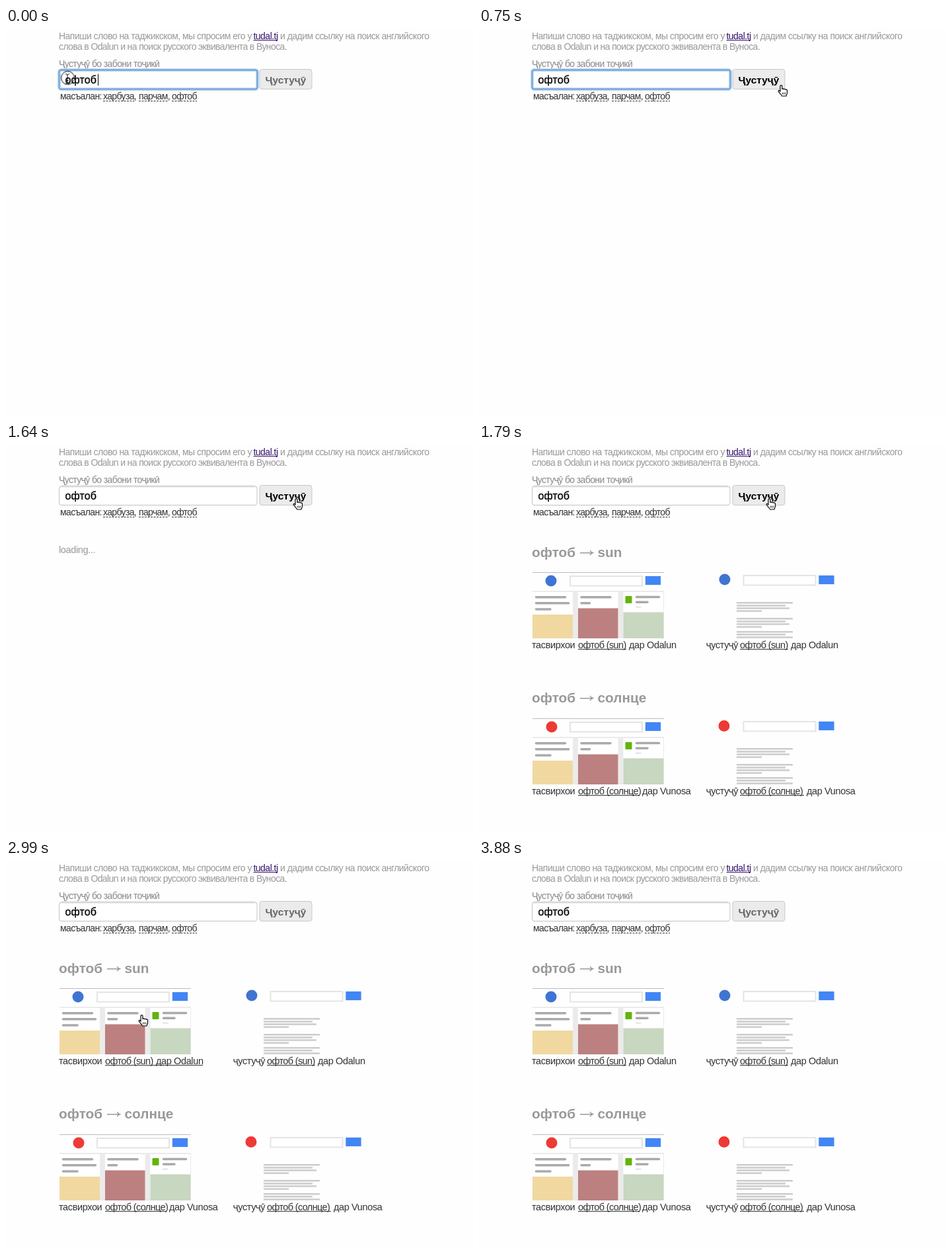
Animation of 707x587 px, one loop 5.4 s. Source, as an HTML page:

```html
<!DOCTYPE html>
<html lang="ru">
<head>
<meta charset="utf-8">
<title>Dictionary search</title>
<style>
  html, body { margin: 0; width: 100%; height: 100%; overflow: hidden; background: #fefefe; }
  svg { display: block; width: 707px; height: 587px; }
  text { font: 14px "Liberation Sans", Arial, sans-serif; white-space: pre; }
  .note { fill: #999; letter-spacing: -.53px; }
  .label { fill: #888; letter-spacing: -.62px; }
  .hint { fill: #333; letter-spacing: -.64px; }
  .word { font-size: 16px; letter-spacing: .1px; stroke: #000; stroke-width: .3px; }
  .btn { font-size: 15.5px; font-weight: bold; text-anchor: middle; }
  .head { font-size: 20.8px; font-weight: bold; fill: #999; }
  .cap { font-size: 14.5px; fill: #333; letter-spacing: -.38px; }
  .link { letter-spacing: -.63px; }
  .loading { fill: #999; }
  .line { fill: none; stroke: #333; }
  .dash { stroke-dasharray: 3 1.5; }

  /* Every part holds its pose until the next step of the 5.4 s loop. */
  .step { animation: 5.4s step-end infinite; }
  .beam { animation-name: beam; }
  .hand { animation-name: hand; }
  .arrow { animation-name: arrow; }
  .ring { animation-name: ring; }
  .caret { animation-name: caret; }
  .focus { animation-name: focus; }
  .btn { animation-name: hover; }
  .loading { animation-name: loading; }
  .results { animation-name: results; }
  .under-end { animation-name: under-end; }
  .under-start { animation-name: under-start; }

  @keyframes beam {
    0% { transform: translate(89.5px, 69px); visibility: visible; }
    5.55% { transform: translate(235px, 73px); visibility: visible; }
    8.33% { transform: translate(364px, 78px); visibility: visible; }
    11.11%, 100% { visibility: hidden; }
  }
  @keyframes hand {
    0% { visibility: hidden; }
    11.11% { transform: translate(448px, 86px); visibility: visible; }
    13.88% { transform: translate(452px, 86px); visibility: visible; }
    16.48% { transform: translate(437px, 82px); visibility: visible; }
    19.25% { transform: translate(434px, 82px); visibility: visible; }
    47.03% { transform: translate(434px, 82px); visibility: hidden; }
    52.59% { transform: translate(202px, 233px); visibility: visible; }
    55.37% { transform: translate(200px, 234px); visibility: visible; }
    58.14% { transform: translate(199px, 234px); visibility: visible; }
    66.29% { transform: translate(199px, 236px); visibility: visible; }
    69.07%, 100% { transform: translate(199px, 236px); visibility: hidden; }
  }
  @keyframes arrow {
    0% { visibility: hidden; }
    47.03% { transform: translate(364px, 115px); visibility: visible; }
    49.81% { transform: translate(241px, 198px); visibility: visible; }
    52.59%, 100% { visibility: hidden; }
  }
  @keyframes ring {
    0% { transform: translate(93.5px, 75.5px); visibility: visible; }
    2.77% { transform: translate(93.5px, 75.5px); visibility: hidden; }
    27.59% { transform: translate(440.5px, 80.5px); visibility: visible; }
    30.37%, 100% { visibility: hidden; }
  }
  @keyframes caret {
    0%, 16.48% { visibility: visible; }
    5.55%, 24.81%, 100% { visibility: hidden; }
  }
  @keyframes focus {
    0% { visibility: visible; }
    27.59%, 100% { visibility: hidden; }
  }
  @keyframes hover {
    0%, 49.81%, 100% { fill: #666; }
    11.11% { fill: #000; }
  }
  @keyframes loading {
    0%, 33.14%, 100% { visibility: hidden; }
    30.37% { visibility: visible; }
  }
  @keyframes results {
    0% { visibility: hidden; }
    33.14%, 100% { visibility: visible; }
  }
  @keyframes under-end {
    0%, 69.07%, 100% { visibility: hidden; }
    52.59% { visibility: visible; }
  }
  @keyframes under-start {
    0%, 71.85%, 100% { visibility: hidden; }
    60.92% { visibility: visible; }
  }
</style>
</head>
<body>
<svg viewBox="0 0 707 587">
  <defs>
    <g id="search">
      <rect x="1" y="1" width="109" height="14.5" fill="#fff" stroke="#e4e4e4" stroke-width="2"/>
      <rect x="115" y="1" width="23" height="13" fill="#4285f4" stroke="#4285f4" stroke-opacity=".3"/>
    </g>

    <g id="tiles">
      <path d="M81 194.5H280" stroke="#bbb"/>
      <path d="M81 222H280V294H81z" fill="#ebebeb"/>
      <path d="M81 224h61v70h-61zM150 224h60.5v70h-60.5zM218.5 224h60.500v70h-60.5z" fill="#fff"/>
      <path d="M81 258h61v36h-61z" fill="#f0d8a0"/>
      <path d="M150 248.5h60.5v45.5h-60.5z" fill="#bc8080"/>
      <path d="M218.5 254.5h61v39.5h-61z" fill="#c8d7c0"/>
      <rect x="221.5" y="230" width="10" height="11" rx="1" fill="#62b40a"/>
      <g stroke="#aaa" stroke-width="3.6" stroke-linecap="round">
        <path d="M86.5 231.7H130.5M86.5 240.7H135.5M86.5 250H108"/>
        <path d="M155 231.7H199M155 240.7H167.5"/>
        <path d="M238.5 231.5H272.5M238.5 239.3H255"/>
      </g>
      <path d="M237 246.7h8.5" stroke="#e2e2e2" stroke-width="2"/>
      <use href="#search" x="137" y="199"/>
    </g>

    <g id="rows" stroke="#ccc" stroke-width="2.5">
      <path id="para" d="M390 240.3h85M390 244.5h74M390 248.6h80M390 252.8h38"/>
      <use href="#para" y="24"/>
      <path d="M390 284.2h85M390 288.3h74M390 292.4h85"/>
      <use href="#search" x="399.5" y="198" stroke-width="1"/>
    </g>

    <path id="to" d="M153 164.7H172M168 161.200Q169.500 163.700 172.500 164.700Q169.500 165.700 168 168.200"
          fill="none" stroke="#999" stroke-width="1.4"/>
  </defs>

  <rect width="707" height="587" fill="#fefefe"/>

  <g class="note">
    <text x="80" y="16.5">Напиши слово на таджикском, мы спросим его у</text>
    <text x="374.5" y="16.5" fill="#33106b">tudal.tj</text>
    <text x="415" y="16.5">и дадим ссылку на поиск английского</text>
    <text x="80" y="32.5" letter-spacing="-.62">слова в Odalun и на поиск русского эквивалента в Вуноса.</text>
  </g>
  <path d="M374.5 18.5H411" stroke="#33106b"/>

  <text class="label" x="80" y="58.5">Ҷустуҷӯ бо забони тоҷикӣ</text>

  <rect x="80.5" y="63.5" width="299.5" height="29" rx="3.5" fill="#fff" stroke="#c2c2c2"/>
  <path d="M82 65H379" stroke="#e9e9e9" stroke-width="2"/>
  <g class="step focus" fill="none">
    <rect x="80.5" y="63.5" width="300" height="29" rx="3" fill="#fff" stroke="#c3dcf6" stroke-width="5"/>
    <rect x="80.5" y="63.5" width="300" height="29" rx="3" stroke="#7ba8da" stroke-width="2.4"/>
  </g>
  <text class="word" x="89.5" y="84">офтоб</text>
  <path class="step caret" d="M139.5 69.5V87" stroke="#000"/>

  <rect x="384" y="62.5" width="79" height="30" rx="3.5" fill="#ebebeb" stroke="#c8c8c8"/>
  <text class="step btn" x="423.5" y="84">Ҷустуҷӯ</text>

  <g class="hint">
    <text x="82" y="108">масъалан:</text>
    <text x="147" y="108">харбуза,</text>
    <text x="201" y="108">парчам,</text>
    <text x="251" y="108">офтоб</text>
  </g>
  <path class="line dash" d="M147 110.5H194.5M201 110.5H245M251 110.5H289"/>

  <text class="step cap loading" x="80" y="165">loading...</text>

  <g class="step results">
    <text class="head" x="80" y="171">офтоб</text>
    <use href="#to"/>
    <text class="head" x="179.5" y="171">sun</text>
    <use href="#tiles"/>
    <use href="#rows"/>
    <circle cx="109" cy="207" r="8.5" fill="#3f74d1"/>
    <circle cx="372" cy="205" r="8.5" fill="#3f74d1"/>
    <text class="cap" x="80" y="309">тасвирхои</text>
    <text class="cap link" x="150" y="309">офтоб (sun)</text>
    <text class="cap" x="227" y="309">дар Odalun</text>
    <text class="cap" x="344" y="309">ҷустуҷӯ</text>
    <text class="cap link" x="395" y="309">офтоб (sun)</text>
    <text class="cap" x="472" y="309">дар Odalun</text>
    <path class="line" d="M150 310.5H223M395 310.5H468"/>

    <text class="head" x="80" y="391">офтоб</text>
    <use href="#to" y="220"/>
    <text class="head" x="179.5" y="391">солнце</text>
    <use href="#tiles" y="221"/>
    <use href="#rows" y="221"/>
    <circle cx="110" cy="428" r="8.5" fill="#ee3a34"/>
    <circle cx="371" cy="426.5" r="8.5" fill="#ee3a34"/>
    <text class="cap" x="80" y="530">тасвирхои</text>
    <text class="cap link" x="150" y="530">офтоб (солнце)</text>
    <text class="cap" x="247" y="530">дар Vunosa</text>
    <text class="cap" x="344" y="530">ҷустуҷӯ</text>
    <text class="cap link" x="395" y="530">офтоб (солнце)</text>
    <text class="cap" x="496" y="530">дар Vunosa</text>
    <path class="line" d="M150 531.5H243M395 531.5H492"/>
  </g>
  <path class="step line under-end" d="M223 310.5H298"/>
  <path class="step line under-start" d="M80 310.5H150"/>

  <path class="step beam" d="M.5 .5Q3 .5 3.5 2Q4 .5 6.5 .5M3.5 2V14M.5 15.5Q3 15.5 3.5 14Q4 15.5 6.5 15.5M2 10.5H5"
        fill="none" stroke="#000"/>
  <circle class="step ring" r="10" fill="none" stroke="#000"/>
  <path class="step arrow" d="M1 1v14l3.3-3.1 2.1 5 2.2-.9-2.1-4.9H11z" fill="#000" stroke="#fff"/>
  <g class="step hand" stroke="#000" stroke-linejoin="round">
    <path d="M4 10V2.2a1.5 1.5 0 0 1 3 0V6.5c.3-1 2.5-1 2.8.3c.3-.8 2.3-.8 2.6.5c.4-.7 2.1-.5 2.1 1.2V12c0 2-1.2 2.8-1.5 5H6.5C6 14.5 2.5 12.5 1.2 9.8C.8 8.6 2.2 8 3 8.8z"
          fill="#fff" stroke-width="1.2"/>
    <path d="M7.5 11.5v3M9.5 11.5v3M11.5 11.5v3" stroke-width=".8"/>
  </g>
</svg>
</body>
</html>
```
